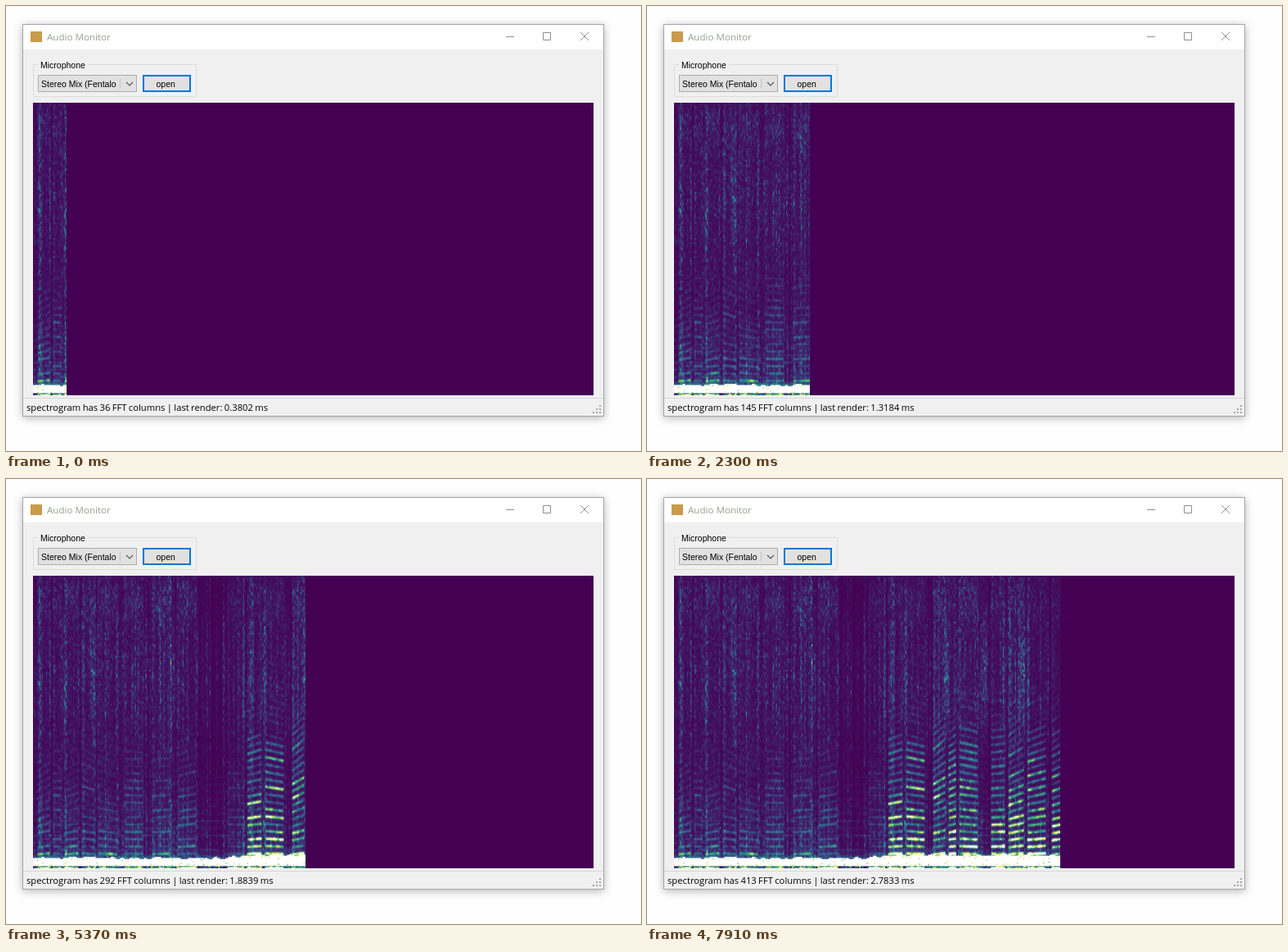
Recreate the animation shown at these times as an HTML page with a canvas. Size 776 px wide and 543 px high, loop 7.99 s.

```html
<!DOCTYPE html>
<html lang="en">
<head>
<meta charset="utf-8">
<title>Audio Monitor</title>
<style>
  html, body { margin: 0; width: 100%; height: 100%; overflow: hidden; background: #fefefe; }
  #stage { position: relative; width: 776px; height: 543px; overflow: hidden; }
  #window { position: absolute; left: 20px; top: 22px; width: 709px; height: 477px;
    border: 1px solid #a5a5a5; background: #f0f0f0; box-shadow: 0 2px 10px rgba(0, 0, 0, .28); }
  svg, canvas { position: absolute; left: 0; top: 0; }
  canvas { left: 33px; top: 118px; }
  text { white-space: pre; }
  .ui { font: 10.5px "Liberation Sans", Arial, sans-serif; }
  .status { font: 11.25px "Open Sans", sans-serif; word-spacing: -.6px; }
  .title { font: 11.6px "Open Sans", sans-serif; fill: #98a08f; }
</style>
</head>
<body>
<div id="stage">
  <div id="window"></div>
  <svg width="776" height="543" viewBox="0 0 776 543">
    <rect x="21" y="23" width="709" height="30" fill="#fff"/>
    <rect x="30" y="31" width="14" height="13" fill="#c99b4a"/>
    <text class="title" x="50" y="42">Audio Monitor</text>
    <path d="M611 37.5h10M656.5 32.5h9v9h-9zM702 32l10 10M712 32l-10 10" fill="none" stroke="#8f8f8f"/>
    <path d="M39 71.5H33.5V110.5H232.5V71.5H100" fill="none" stroke="#dcdcdc"/>
    <text class="ui" x="42" y="76">Microphone</text>
    <rect x="39.5" y="84.5" width="120" height="20" fill="#e1e1e1" stroke="#adadad"/>
    <path d="M139.5 89v11" stroke="#c4c4c4"/>
    <path d="M147 93l4 4 4-4" fill="none" stroke="#555" stroke-width="1.1"/>
    <text class="ui" x="43" y="99">Stereo Mix (Fentalo</text>
    <rect x="168" y="85" width="57" height="19" fill="#e1e1e1" stroke="#0078d7" stroke-width="2"/>
    <text class="ui" x="183.5" y="99">open</text>
    <path d="M21 478.5H730" stroke="#d7d7d7"/>
    <path d="M725 488h2M721 492h6M717 496h10" stroke="#a6a6a6" stroke-width="2" stroke-dasharray="2"/>
    <text class="status" id="status" x="25" y="494"></text>
  </svg>
  <canvas id="view" width="685" height="357"></canvas>
</div>
<script>
const LOOP = 7990, STEP = 76.83, LAST_STEP = 103;
const COLS = 600, ROWS = 256, WIDTH = 685, HEIGHT = 357, LEFT = 33;

const ONSETS = [38, 57, 71, 92, 112, 144, 178, 209, 270, 294, 316, 349, 368, 381, 420, 441, 464, 494];
const BURSTS = [105, 365, 413, 458];
const VIRIDIS = [[68, 1, 84], [59, 82, 139], [33, 145, 140], [94, 201, 98], [253, 231, 37], [255, 255, 255]];
const RENDER_TIMES = [[36, .3802], [80, .8151], [145, 1.3184], [244, 1.6639], [292, 1.8839], [343, 2.2026], [413, 2.7833]];

const bell = d => Math.exp(-d * d);
const mix = (a, b, t) => a + (b - a) * t;
const ease = t => t * t * (3 - 2 * t);
const clamp = (v, lo, hi) => Math.max(lo, Math.min(hi, v));

function random(a, b = 0) {
  let h = Math.imul(a + 101, 374761393) ^ Math.imul(b + 57, 668265263);
  h = Math.imul(h ^ (h >>> 13), 1274126177);
  return ((h ^ (h >>> 16)) >>> 0) / 4294967296;
}

function smooth(x, seed) {
  const i = Math.floor(x);
  return mix(random(i, seed), random(i + 1, seed), ease(x - i));
}

function colour(v) {
  const p = clamp(v * 4, 0, 4.999), i = Math.floor(p);
  return VIRIDIS[i].map((c, k) => mix(c, VIRIDIS[i + 1][k], p - i));
}

// The voice gets louder about halfway through the recording.
const loudness = x => mix(.8, 1.65, ease(clamp((x - 265) / 40, 0, 1)));

const sounds = ONSETS.map((start, i) => ({
  start,
  length: Math.min(24, (ONSETS[i + 1] ?? 520) - start - 3),
  loud: loudness(start),
  slope: .2 * (random(i, 7) - .5),
  mid: .5 + random(i, 8),
  breath: .04 + .06 * random(i, 9),
  seed: i + 20
}));

function harmonics(sound, x, f) {
  const t = (x - sound.start) / sound.length;
  const pitch = 8.9 * (1 + sound.slope * (t - .5));
  const n = Math.round(f / pitch);
  const line = bell((f - n * pitch) / 1.6) * (.25 + 1.1 * random(n, sound.seed)) * (.45 + .9 * smooth(x / 4, n));
  const low = 1.5 * sound.loud * Math.exp(-f / (34 * sound.loud));
  const mid = .16 * sound.loud ** 2 * sound.mid * bell((f - 98) / 50);
  return Math.min(1, 4 * Math.sin(Math.PI * t)) * line * (low + mid);
}

function clickStrength(x, col) {
  let sum = .02 + .26 * smooth(col / 1.6, 77) ** 3;
  for (const { start, length, breath } of sounds) {
    sum += 1.3 * breath * (bell((x - start - 2) / 1.6) + bell((x - start - length) / 1.6));
  }
  return sum;
}

function baseBand(x, col, row, f) {
  const top = 8 + 4 * loudness(x) + 3 * smooth(col / 5, 900);
  if (f < 3) return 1.1 * random(col, row) * smooth(col / 3, 901);
  if (f < top) return 1.4 - .7 * (random(col, row) > .96);
  return .5 * Math.exp((top - f) / 3) * random(col, row);
}

function level(x, col, row, click, sound) {
  const f = HEIGHT - (row + .5) * HEIGHT / ROWS;
  const grain = .25 + 2.6 * random(col, row >> 1) * smooth(row / 2.5, col) ** 1.5;
  const shape = .65 + .25 * Math.sin(f / 34 + 1);
  let broad = click * shape, tone = 0;
  if (sound) {
    broad += sound.breath * (.5 + .9 * bell((f - 325) / 26));
    tone = harmonics(sound, x, f);
  }
  for (const burst of BURSTS) {
    broad += .17 * bell((x - burst) / 3) * bell((f - 245) / 65);
  }
  const steady = .22 * bell((f % 8.9 - 4.5) / 1.4) * Math.exp(-f / 55) * smooth(x / 14, Math.floor(f / 8.9));
  return broad * grain + (tone + steady) * (.7 + .5 * random(col, row + 500)) + baseBand(x, col, row, f);
}

function paintSpectrogram() {
  const canvas = document.createElement('canvas');
  canvas.width = COLS;
  canvas.height = ROWS;
  const ctx = canvas.getContext('2d');
  const image = ctx.createImageData(COLS, ROWS);
  for (let col = 0; col < COLS; col++) {
    const x = LEFT + (col + .5) * WIDTH / COLS;
    const click = clickStrength(x, col);
    const sound = sounds.find(s => x >= s.start && x <= s.start + s.length);
    for (let row = 0; row < ROWS; row++) {
      image.data.set([...colour(level(x, col, row, click, sound)), 255], (row * COLS + col) * 4);
    }
  }
  ctx.putImageData(image, 0, 0);
  return canvas;
}

function renderTime(cols, step) {
  const next = Math.max(1, RENDER_TIMES.findIndex(([c]) => c >= cols));
  const [c0, m0] = RENDER_TIMES[next - 1], [c1, m1] = RENDER_TIMES[next];
  const t = (cols - c0) / (c1 - c0);
  return mix(m0, m1, t) + .12 * (random(step, 42) - .5) * Math.sin(Math.PI * t);
}

const spectrogram = paintSpectrogram();
const view = document.getElementById('view').getContext('2d');
const status = document.getElementById('status');
const start = performance.now();
let shown = -1;

function draw(step) {
  const cols = Math.floor(36.1 + 3.66 * step);
  const edge = Math.round(cols * WIDTH / COLS);
  view.drawImage(spectrogram, 0, 0, WIDTH, HEIGHT);
  view.fillStyle = '#440154';
  view.fillRect(edge, 0, WIDTH - edge, HEIGHT);
  status.textContent = `spectrogram has ${cols} FFT columns | last render: ${renderTime(cols, step).toFixed(4)} ms`;
}

function tick() {
  const time = Math.max(0, performance.now() - start) % LOOP;
  const step = Math.min(LAST_STEP, Math.floor((Math.floor(time / 10) * 10 + 9.99) / STEP));
  if (step !== shown) draw(shown = step);
  requestAnimationFrame(tick);
}
tick();
</script>
</body>
</html>
```
